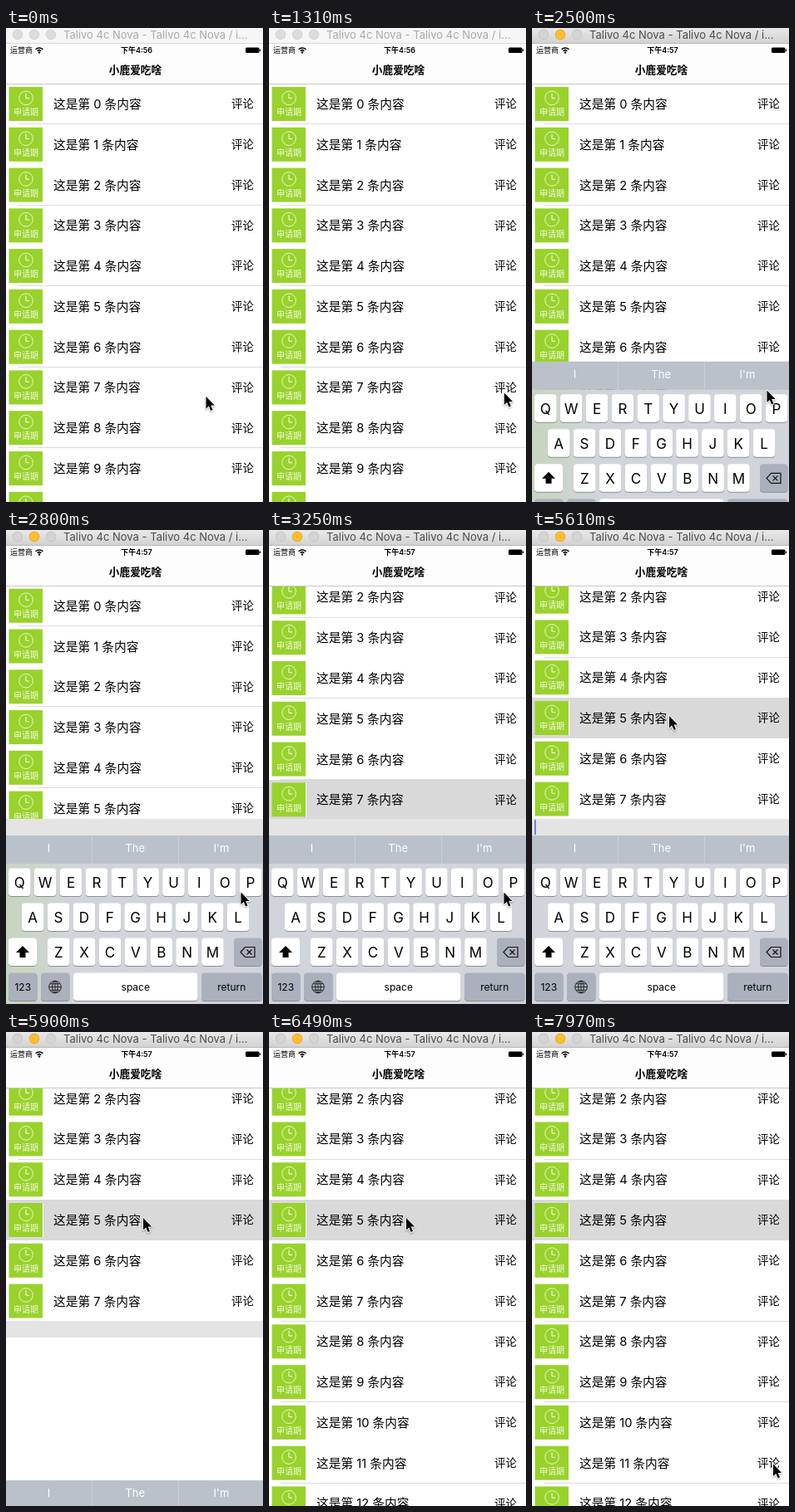
An HTML page with a canvas that plays this animation: 309x571 px, repeating every 8 s.

```html
<!DOCTYPE html>
<html lang="zh-CN">
<head>
<meta charset="utf-8">
<style>
html, body { margin: 0; width: 100%; height: 100%; overflow: hidden; background: #fff; }
canvas { display: block; width: 309px; height: 571px; }
</style>
</head>
<body>
<canvas></canvas>
<script>
const W = 309, H = 571, LOOP = 8000, STEP = 148;
const ROW = 48.78, TOP = 67.2, BAR_TOP = 348, KEYS_TOP = 368;
const MAX_SCROLL = 108.9;
const FONT = 'Inter, "Noto Sans CJK SC", "Noto Sans CJK", sans-serif';
const DEVICE = 'Talivo 4c Nova';

// Pointer stops: step, x, y
const PATH = [
  [0, 240.5, 444], [1, 240.5, 444], [4, 250, 451], [7, 272, 447], [9, 282.8, 439.5],
  [10, 282.8, 439.5], [12, 282.5, 436.5], [26, 282.5, 436.5], [31, 210, 286],
  [34, 168, 248], [37, 165, 224], [46, 165, 224], [51, 292, 522], [52, 292, 522], [54, 290, 520.5]
];

const canvas = document.querySelector('canvas');
const ctx = canvas.getContext('2d');
const dpr = window.devicePixelRatio || 1;
canvas.width = W * dpr;
canvas.height = H * dpr;

const clamp = v => Math.max(0, Math.min(1, v));
const easeOut = u => 1 - (1 - clamp(u)) ** 3;
const easeInOut = u => (1 - Math.cos(Math.PI * clamp(u))) / 2;

function rect(x, y, w, h, color) {
  ctx.fillStyle = color;
  ctx.fillRect(x, y, w, h);
}

function disc(x, y, r, color) {
  ctx.fillStyle = color;
  ctx.beginPath();
  ctx.arc(x, y, r, 0, 7);
  ctx.fill();
}

// y is the optical middle of the line
function text(s, x, y, size, color = '#000', align = 'left', weight = 400) {
  ctx.font = `${weight} ${size}px ${FONT}`;
  ctx.textAlign = align;
  ctx.fillStyle = color;
  ctx.fillText(s, x, y + size * 0.37);
}

function poly(points, close = true) {
  ctx.beginPath();
  points.forEach(([x, y]) => ctx.lineTo(x, y));
  if (close) ctx.closePath();
}

function stroke(color, width) {
  ctx.strokeStyle = color;
  ctx.lineWidth = width;
  ctx.stroke();
}

function pointer(k) {
  const i = Math.max(1, PATH.findIndex(p => p[0] >= k));
  const [k0, x0, y0] = PATH[i - 1], [k1, x1, y1] = PATH[i];
  const u = (k - k0) / (k1 - k0);
  ctx.save();
  ctx.translate(x0 + (x1 - x0) * u, y0 + (y1 - y0) * u);
  poly([[0, 0], [0, 14.5], [3.3, 11.5], [5.7, 17], [8, 16], [5.7, 10.6], [10.2, 10.4]]);
  ctx.shadowColor = 'rgba(0,0,0,.35)';
  ctx.shadowBlur = 2 * dpr;
  ctx.shadowOffsetY = dpr;
  ctx.lineJoin = 'round';
  stroke('#fff', 2);
  ctx.shadowColor = 'transparent';
  ctx.fillStyle = '#000';
  ctx.fill();
  ctx.restore();
}

function windowBar(active) {
  const g = ctx.createLinearGradient(0, 0, 0, 18);
  g.addColorStop(0, active ? '#e9e9e9' : '#f6f6f6');
  g.addColorStop(1, active ? '#d2d2d2' : '#f6f6f6');
  rect(0, 0, W, 18, g);
  rect(0, 18, W, 1, active ? '#b8b8b8' : '#dadada');
  [14, 34, 54].forEach((x, i) => {
    const lit = active && i === 1;
    disc(x, 8, 6.2, lit ? '#e0a023' : active ? '#bfbfbf' : '#d0d0d0');
    disc(x, 8, 5.6, lit ? '#ffbd2e' : active ? '#d4d4d4' : '#dcdcdc');
  });
  text(`${DEVICE} - ${DEVICE} / i…`, 69, 8.5, 13, active ? '#4c4c4c' : '#a9a9a9');
}

function header(time) {
  rect(0, 19, W, 48, '#fdfdfd');
  rect(0, 67, W, 1, '#c8c8c8');
  text('运营商', 5, 27, 9);
  for (const r of [3.2, 6]) {
    ctx.beginPath();
    ctx.arc(40, 30, r, -Math.PI * 0.76, -Math.PI * 0.24);
    stroke('#000', 1.4);
  }
  disc(40, 29.5, 1.2, '#000');
  text(time, 157, 27, 9, '#000', 'center', 600);
  ctx.fillStyle = '#000';
  ctx.beginPath();
  ctx.roundRect(288, 23.5, 16.5, 6.5, 1.5);
  ctx.fill();
  rect(305, 25.5, 1, 2.5, '#000');
  text('小鹿爱吃啥', 155.5, 50.5, 12.7, '#000', 'center', 600);
}

function row(i, y, selected) {
  if (selected) {
    rect(0, Math.round(y), W, Math.round(ROW), '#d9d9d9');
    rect(44, y + 4, 1, 41, '#fff');
  }
  rect(3.5, y + 3.8, 40.5, 41, '#99d22b');
  ctx.beginPath();
  ctx.arc(24, y + 17.2, 8.3, 0, 7);
  stroke('rgba(255,255,255,.85)', 0.9);
  poly([[24, y + 11.5], [24, y + 17.5], [28, y + 17.5]], false);
  stroke('#fff', 1);
  text('申请期', 24, y + 34.3, 10, '#f6fbe9', 'center');
  text(`这是第 ${i} 条内容`, 57, y + 24.4, 14.7);
  text('评论', 271, y + 24.2, 13.4);
}

function list(scroll, selected, bottom) {
  ctx.save();
  ctx.beginPath();
  ctx.rect(0, 68, W, bottom - 68);
  ctx.clip();
  // Hairlines survive the downscale on every other row only
  const parity = scroll > 108.4 ? 1 : 0;
  for (let i = 0; i < 14; i++) {
    const y = TOP + i * ROW - scroll;
    if (y < TOP - ROW || y > H) continue;
    row(i, y, i === selected);
    if (i % 2 === parity && i !== selected) {
      rect(14, Math.floor(y + ROW - 0.3), W - 14, 1, '#dcdcdc');
    }
  }
  ctx.restore();
}

function key(x, y, w, label = '', size = 17, color = '#fff') {
  ctx.fillStyle = '#8b8e94';
  ctx.beginPath();
  ctx.roundRect(x, y + 1, w, 33.5, 4);
  ctx.fill();
  ctx.fillStyle = color;
  ctx.beginPath();
  ctx.roundRect(x, y, w, 33.5, 4);
  ctx.fill();
  text(label, x + w / 2, y + 17, size, '#000', 'center');
}

function keyIcons() {
  ctx.fillStyle = '#000';
  poly([[20, 133], [28, 141], [23.5, 141], [23.5, 147], [16.5, 147], [16.5, 141], [12, 141]]);
  ctx.fill();

  poly([[282, 140.5], [287.5, 134.5], [299, 134.5], [299, 146.5], [287.5, 146.5]]);
  stroke('#111', 1.2);
  for (const d of [-3, 3]) {
    poly([[292.5 - d, 137.5], [292.5 + d, 143.5]], false);
    stroke('#111', 1.2);
  }

  for (const rx of [7.3, 3.3]) {
    ctx.beginPath();
    ctx.ellipse(59, 182.5, rx, 7.3, 0, 0, 7);
    stroke('#111', 0.9);
  }
  for (const [x0, y0, x1, y1] of [[51.7, 182.5, 66.3, 182.5], [59, 175.2, 59, 189.8],
    [53, 178.7, 65, 178.7], [53, 186.3, 65, 186.3]]) {
    poly([[x0, y0], [x1, y1]], false);
    stroke('#111', 0.8);
  }
}

function keyboard(drop, tint) {
  const gray = '#abb1bc', pitch = 30.86;
  ctx.save();
  ctx.translate(0, KEYS_TOP + drop);
  rect(0, 0, W, 34, '#bac1c9');
  rect(0, 34, W, 170, '#d1d5db');
  if (tint > 0) {
    const g = ctx.createLinearGradient(0, 0, 75, 0);
    g.addColorStop(0, `rgba(178,212,130,${0.3 * tint})`);
    g.addColorStop(0.4, `rgba(178,212,130,${0.22 * tint})`);
    g.addColorStop(1, 'rgba(178,212,130,0)');
    rect(0, 34, 75, 170, g);
  }
  ['I', 'The', "I'm"].forEach((s, i) => text(s, 51.5 + i * 103.7, 15.5, 13, '#fff', 'center'));
  rect(103, 0, 1, 34, '#cbd0d5');
  rect(207, 0, 1, 34, '#cbd0d5');

  [['QWERTYUIOP', 3, 39.5], ['ASDFGHJKL', 18.9, 81.5], ['ZXCVBNM', 50, 123.5]].forEach(([s, x, y]) =>
    [...s].forEach((c, i) => key(x + i * pitch, y, 26.6, c)));
  key(3, 123.5, 34, '');
  key(274, 123.5, 33.5, '', 12, gray);
  key(3, 165.5, 34.5, '123', 12, gray);
  key(42, 165.5, 34.5, '', 12, gray);
  key(81, 165.5, 149.5, 'space', 12);
  key(235, 165.5, 72.5, 'return', 12, gray);
  keyIcons();
  ctx.restore();
}

function draw(t) {
  const k = Math.floor((t + 24) / STEP);
  const since = start => (k - start) * STEP;
  const active = k >= 14;
  const scroll = MAX_SCROLL * easeInOut(since(18.9) / 485);
  const selected = k < 15 ? -1 : k < 38 ? 7 : 5;
  const up = easeOut(since(15.9) / 362) - easeOut(since(38.86) / 362);
  const bar = k >= 18 && k < 43;
  const caret = k >= 24 && k < 39 && (k - 24) % 7 < 3;

  ctx.setTransform(dpr, 0, 0, dpr, 0, 0);
  rect(0, 0, W, H, '#fff');
  list(scroll, selected, bar ? BAR_TOP : H);
  if (bar) rect(0, BAR_TOP, W, 20, '#e4e4e4');
  if (caret) rect(3, BAR_TOP + 1, 1.6, 18, '#4a6fe0');
  if (up > 0.003) keyboard((1 - up) * (H - KEYS_TOP), 1 - scroll / MAX_SCROLL);
  header(active ? '下午4:57' : '下午4:56');
  windowBar(active);
  pointer(k);
}

function loop() {
  draw(performance.now() % LOOP);
  requestAnimationFrame(loop);
}
loop();
</script>
</body>
</html>
```
